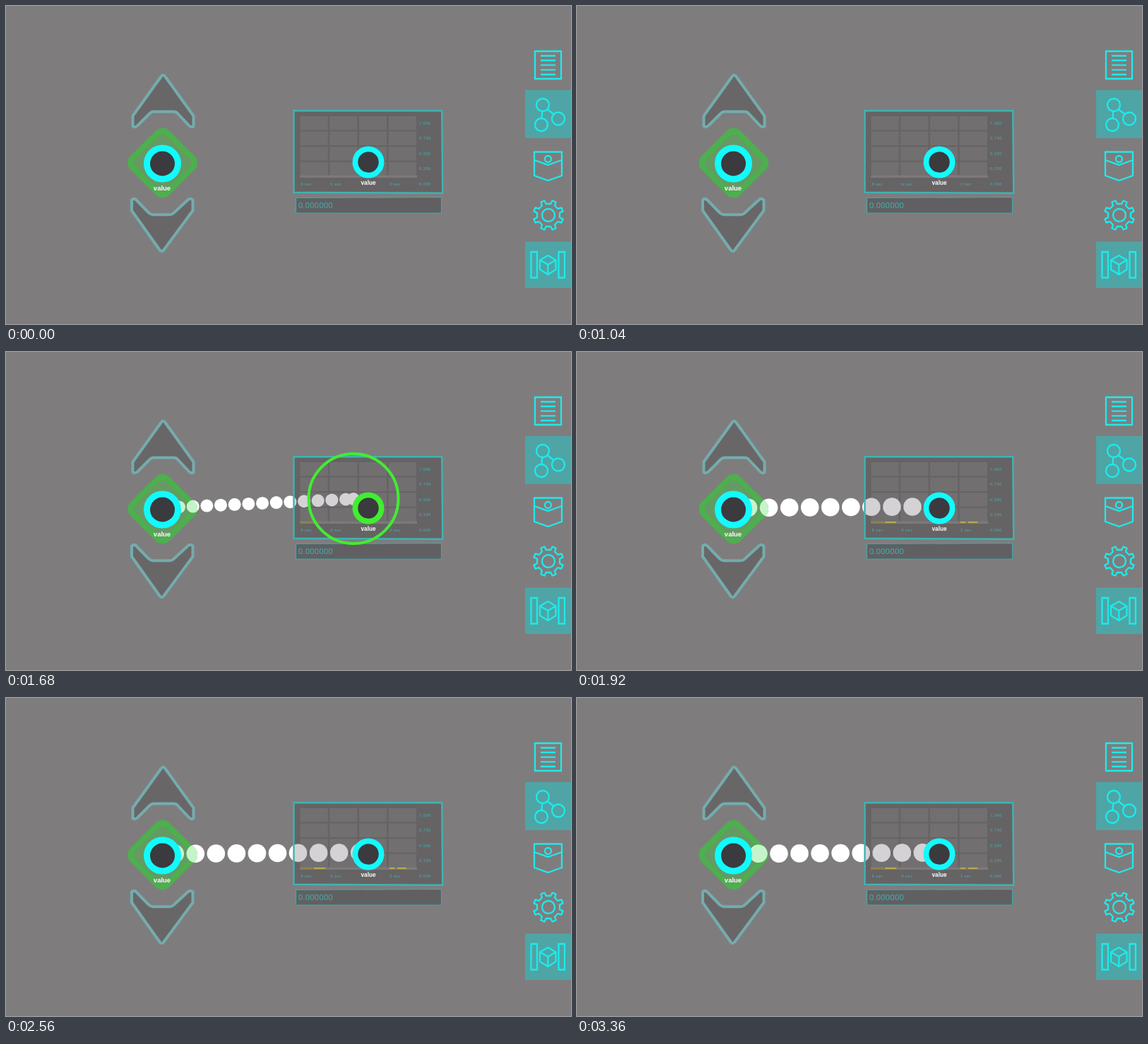
These frames come from a looping animation (800 by 450 pixels, 3440 ms). An HTML page:

```html
<!DOCTYPE html>
<html lang="en">
<head>
<meta charset="utf-8">
<title>Linking two value nodes</title>
<style>
html, body { margin: 0; width: 100%; height: 100%; overflow: hidden; background: #7f7c7e; }
svg { display: block; width: 800px; height: 450px; }
.icon { fill: none; stroke: #1eeaea; stroke-width: 2.3; }
.arrow { fill: #696668; stroke: #74acac; stroke-width: 4; stroke-linejoin: round; }
.name { font: bold 9.5px "Liberation Sans", Arial, sans-serif; fill: #fff; text-anchor: middle; }
.axis { font: 500 5.6px Roboto, sans-serif; letter-spacing: .5px; fill: #45a5a4; }
.readout { font: 11.7px Roboto, sans-serif; fill: #49a9a8; }
</style>
</head>
<body>
<svg viewBox="0 0 800 450">
  <defs>
    <g id="dots"></g>
    <path id="frame" d="M407.5 148.3H617.2L618.2 264.8 407.5 263.8Z"/>
    <rect id="tile" x="-39" y="-39" width="78" height="78" rx="14" transform="translate(221.7 222) rotate(45)"/>
    <clipPath id="inFrame"><use href="#frame"/></clipPath>
    <clipPath id="inTile"><use href="#tile"/></clipPath>
  </defs>

  <rect width="800" height="450" fill="#7f7c7e"/>
  <use href="#dots" fill="#fff"/>

  <!-- Chart panel -->
  <use href="#frame" fill="#666365"/>
  <g id="cells" fill="#726f71"></g>
  <rect x="416" y="239.5" width="166" height="3.5" fill="#7c797b"/>
  <g id="labels" class="axis"></g>
  <use href="#dots" fill="#d4d2d4" clip-path="url(#inFrame)"/>
  <g id="trace" stroke-width="1.8">
    <path d="M416 240.8H434" stroke="#91833f"/>
    <path id="spikes" d="M436 240.8H452M543 240.8H550M554 240.8H567" stroke="#c0b53c"/>
  </g>
  <use href="#frame" fill="none" stroke="#3fb3b1" stroke-width="2.4"/>
  <path d="M410.5 271.5L616.5 270.5V293H410.5Z" fill="#615f61" stroke="#3fa9a8" stroke-width="1.2"/>
  <text class="readout" x="413.8" y="286.3">0.000000</text>

  <!-- Stepper -->
  <path class="arrow" d="M179.500 170V155.500L219.500 100Q222.500 95.500 225.500 100L265.500 155.500V170Q262 172.500 259 169L243 152Q241 149.500 237 149.500H209Q206 149.500 203.500 152L186 169.500Q182 172.500 179.500 170Z"/>
  <path class="arrow" d="M178 274.500V289.500L217.500 345Q220.500 349.500 223.500 345L264.500 289.500V274.500Q262 271.500 258.500 273.500L239 291.500Q235.500 295.200 232 295.200H208Q205 295.200 202 292.500L184 274Q180.500 271.500 178 274.500Z"/>
  <use href="#tile" fill="#4daf4e"/>
  <rect x="-31" y="-31" width="62" height="62" rx="8" transform="translate(221.7 222) rotate(45)" fill="#659a64"/>
  <use href="#dots" fill="#c6f4ca" clip-path="url(#inTile)"/>

  <circle id="ring" r="63.5" fill="none" stroke="#40ee30" stroke-width="4"/>

  <circle cx="221.5" cy="223" r="22" fill="#3b3a3e" stroke="#12fafc" stroke-width="9"/>
  <text class="name" x="221" y="261">value</text>
  <circle id="goal" cx="513" cy="221" r="18.600" fill="#3b3a3e" stroke="#12fafc" stroke-width="7.800"/>
  <text class="name" x="513" y="253.300" style="font-size:8.200px">value</text>

  <!-- Side menu -->
  <path d="M735 119H800V187H735ZM735 333.500H800V399H735Z" fill="#4fa4a5"/>
  <g class="icon">
    <path d="M749 64H786V103H749ZM757 70.500H778M757 77H778M757 83.700H778M757 90.300H778M757 97H778"/>
    <circle cx="760" cy="140" r="9"/>
    <circle cx="758" cy="168" r="9"/>
    <circle cx="782" cy="159.500" r="9"/>
    <path d="M759.300 149L758.500 159M767 146.500L775.500 153"/>
    <path stroke-linejoin="round" d="M748 206.500H787V240L767.500 247 748 240ZM748 218L767.500 225 787 218"/>
    <circle cx="767.500" cy="216.500" r="4.500"/>
    <path id="gear" stroke-linejoin="round"/>
    <circle cx="768" cy="296" r="9"/>
    <path d="M743.500 348H752V384.500H743.500ZM782.500 348H791V384.500H782.500Z"/>
    <path stroke-linejoin="round" d="M767.300 353L778.500 359.500V373L767.300 380 756 373V359.500ZM756 359.500L767.300 366 778.500 359.500M767.300 366V380"/>
  </g>
</svg>

<script>
const NS = "http://www.w3.org/2000/svg";
const LOOP = 3440, STEP = 80;
const PULL = 1200, HOVER = 1680, LINK = 1840;
const $ = id => document.getElementById(id);

function add(parent, tag, attrs, text) {
  const el = document.createElementNS(NS, tag);
  for (const k in attrs) el.setAttribute(k, attrs[k]);
  if (text) el.textContent = text;
  return parent.appendChild(el);
}

for (let r = 0; r < 4; r++)
  for (let c = 0; c < 4; c++)
    add($("cells"), "rect", { x: 416.5 + c * 41.7, y: 156 + r * 21.6, width: 39.3, height: 19.4 });
["8 sec", "6 sec", "", "2 sec"].forEach((s, i) =>
  add($("labels"), "text", { x: 417.5 + i * 41.8, y: 253.5 }, s));
["1.000", "0.750", "0.500", "0.250", "0.000"].forEach((s, i) =>
  add($("labels"), "text", { x: 585, y: 168 + i * 21.4 }, s));

// Gear outline: eight trapezoid teeth
const teeth = [];
for (let i = 0; i < 8; i++)
  for (const [turn, r] of [[-.25, 16.3], [-.16, 21.3], [.16, 21.3], [.25, 16.3]]) {
    const a = (i + .5 + turn) * Math.PI / 4;
    teeth.push(`${768 + r * Math.cos(a)} ${296 + r * Math.sin(a)}`);
  }
$("gear").setAttribute("d", `M${teeth.join("L")}Z`);

const pool = Array.from({ length: 18 }, () => add($("dots"), "circle", {}));
const from = { x: 222, y: 220.5 };
const mod = (a, n) => ((a % n) + n) % n;
const show = (el, on) => el.setAttribute("visibility", on ? "visible" : "hidden");

function place(end, gap, r, phase, capEnd) {
  const xs = [];
  for (let x = from.x + mod(phase - from.x, gap); x < end.x; x += gap) xs.push(x);
  if (capEnd) xs.push(end.x);
  pool.forEach((dot, i) => {
    show(dot, i < xs.length);
    if (i >= xs.length) return;
    const k = (xs[i] - from.x) / Math.max(1, end.x - from.x);
    dot.setAttribute("cx", xs[i]);
    dot.setAttribute("cy", from.y + (end.y - from.y) * k);
    dot.setAttribute("r", r);
  });
}

function draw(t) {
  const linked = t >= LINK;
  const pulling = t >= PULL && !linked;
  const p = Math.min(1, Math.max(0, (t - PULL) / (HOVER - PULL)));
  const ease = p * p * (3 - 2 * p);
  const hand = { x: 222 + 270 * ease, y: 220.5 - 12.5 * ease };
  const over = pulling && hand.x > 425;

  if (linked) place({ x: 513, y: 218.7 }, 29.05, 12.8, 274 + .131 * (t - 2160), false);
  else if (pulling) place(hand, 19.67, 9, 245 + .089 * (t - HOVER), true);
  else pool.forEach(dot => show(dot, false));

  show($("ring"), over);
  $("ring").setAttribute("cx", hand.x);
  $("ring").setAttribute("cy", hand.y - .5);
  $("goal").setAttribute("stroke", over ? "#40ee30" : "#12fafc");
  show($("trace"), t >= HOVER);
  show($("spikes"), linked);
}

const start = performance.now();
function tick() {
  const t = (performance.now() - start) % LOOP;
  draw(Math.floor(t / STEP) * STEP);
  requestAnimationFrame(tick);
}
tick();
</script>
</body>
</html>
```
